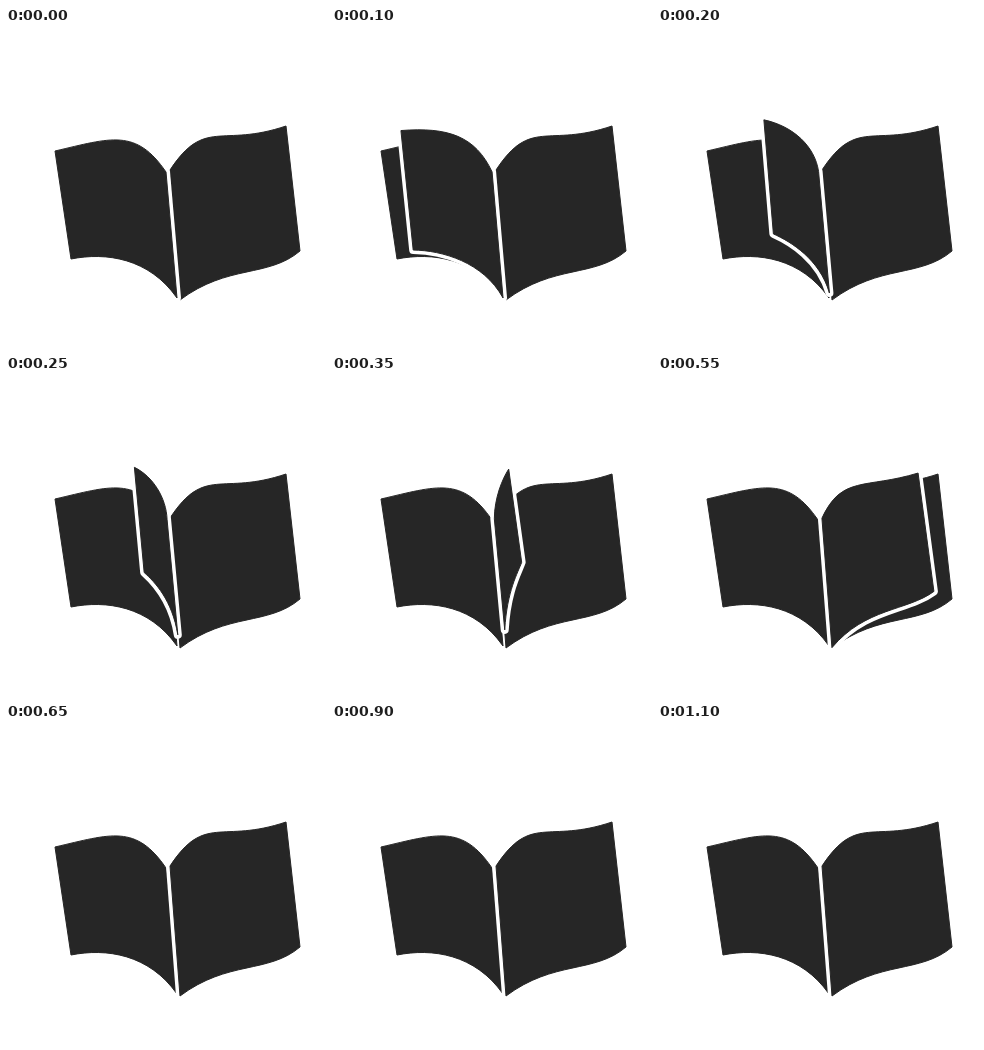
An HTML page that plays this animation: 320 by 320 pixels, repeating every 2.55 s.

```html
<!DOCTYPE html>
<html lang="en">
<head>
<meta charset="utf-8">
<title>Book page turn</title>
<style>
  html, body { margin: 0; width: 100%; height: 100%; overflow: hidden; background: #fff; }
  svg { display: block; width: 100%; height: 100%; }
  path { fill: #262626; stroke: #262626; stroke-width: 1; stroke-linejoin: round; }
  #halo { stroke: #fff; stroke-width: 8; }
</style>
</head>
<body>
<svg viewBox="0 0 320 320">
  <path id="left"/>
  <path id="right"/>
  <path id="halo"/>
  <path id="page"/>
</svg>
<script>
const LOOP = 2550, STEP = 50, TURN = 650;

// Outline of a leaf; r runs from -1 (lying left) to 1 (lying right)
function leaf(r) {
  const r2 = r * r, r3 = r2 * r, lift = 1 - r2, p = (1 - r) / 2;
  const side = Math.sin(r * Math.PI / 2);

  const spineTop = [162 + 2 * side, 143 - r];
  const spineEnd = [172.5 + 1.5 * side, 271 + r - 18 * lift ** 4];
  const top = [164.5 + 115.5 * r, 98 - 11 * p + 36 * p ** 10];
  const bottom = [
    top[0] + 15 - r + lift * (10 * r - 3),
    183 + 44 * Math.abs(r) ** 1.1 - 4 * r
  ];

  const from = ([x, y], dx, dy) => [x + dx, y + dy];
  const upper = [
    from(spineTop, 2.5 * r2 + 32.5 * r3, -20 - 4.5 * r - 28.5 * r2),
    from(top, -60.5 * r - 4.5 * r2, 10 - 5.5 * r2 + 17.5 * r3)
  ];
  const lower = [
    from(bottom, 1.5 * r2 - 33.5 * r, 10 + 17 * r3),
    from(spineEnd, 19 * r + 10 * r2 + 19 * r3, -38 - 12 * r + 14 * r3)
  ];
  return `M${spineTop}C${upper} ${top}L${bottom}C${lower} ${spineEnd}Z`;
}

// Smoothstep softened with a little constant speed
function turn(t) {
  const x = Math.min(t / TURN, 1);
  return 2 * (0.75 * x * x * (3 - 2 * x) + 0.25 * x) - 1;
}

function draw(r, ...ids) {
  for (const id of ids) document.getElementById(id).setAttribute("d", leaf(r));
}

draw(-1, "left");
draw(1, "right");

const start = performance.now();
function frame() {
  const t = (performance.now() - start) % LOOP;
  draw(turn(Math.floor(t / STEP) * STEP), "halo", "page");
  requestAnimationFrame(frame);
}
frame();
</script>
</body>
</html>
```
